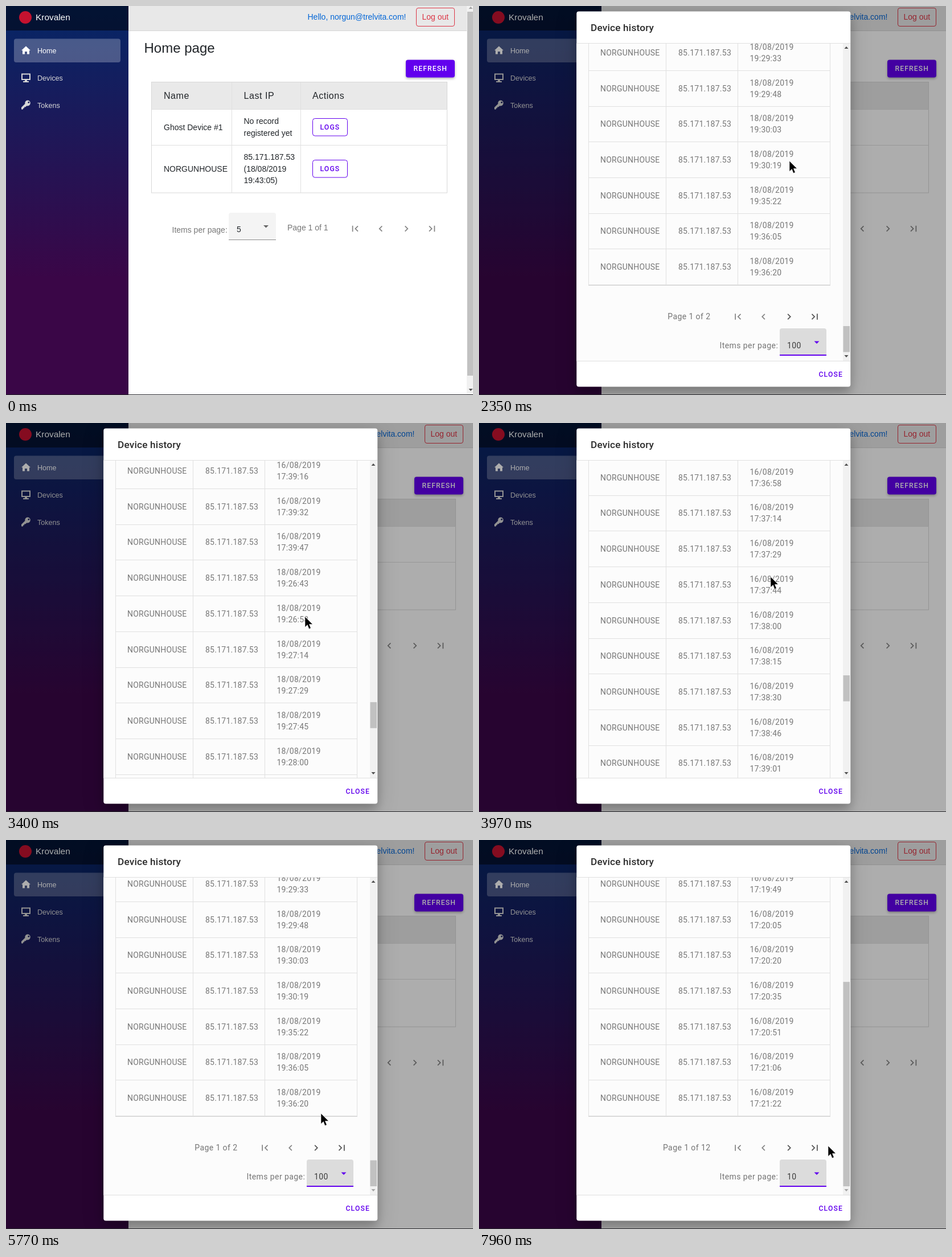
Recreate the animation shown at these times as an HTML page. Size 820 by 683 pixels, loop 7.99 s.

```html
<!DOCTYPE html>
<html lang="en">
<head>
<meta charset="utf-8">
<title>Device history</title>
<style>
html, body { margin: 0; width: 100%; height: 100%; overflow: hidden; background: #fff; }
svg { display: block; width: 820px; height: 683px; }
text { font: 14px "Liberation Sans", Arial, sans-serif; fill: #212529; white-space: pre; }
.nav text { font-size: 12.6px; fill: #d7d7d7; }
.nav path { fill: #d7d7d7; }
.nav .on { fill: #fff; }
.head text { font-size: 16px; letter-spacing: .55px; }
.muted text { fill: #777; }
text.btn { font: 500 12.25px Roboto, sans-serif; letter-spacing: 1.094px; fill: #6200ee; }
.line { fill: none; stroke: #e0e0e0; }
.outline { fill: #fff; stroke: #6200ee; }
.icons path { fill: #858585; }
#dialog { transform-origin: 411.7px 338.8px; }
#dialog text.title { font: 500 17.3px Roboto, sans-serif; letter-spacing: .15px; fill: #2c2c2c; }
#rows text { font-family: Roboto, sans-serif; letter-spacing: .25px; fill: #777; }
#foot text { font-family: Roboto, sans-serif; letter-spacing: .42px; fill: #747474; }
#foot .value { fill: #3c3c3c; }
#surface { filter: drop-shadow(0 10px 9px rgba(0,0,0,.22)) drop-shadow(0 6px 18px rgba(0,0,0,.14)); }
#popup text { font-family: Roboto, sans-serif; }
</style>
</head>
<body>
<svg viewBox="0 0 820 683" xmlns="http://www.w3.org/2000/svg">
  <defs>
    <linearGradient id="side" x1="0" y1="0" x2="0" y2="1">
      <stop offset="0" stop-color="#052767"/><stop offset=".7" stop-color="#3a0647"/>
    </linearGradient>
    <clipPath id="view"><rect x="171" y="66" width="481" height="557"/></clipPath>
    <g id="arrows" class="icons">
      <path transform="translate(-10.5 -10.5) scale(.875)" d="M18.41 16.59L13.82 12l4.59-4.59L17 6l-6 6 6 6zM6 6h2v12H6z"/>
      <path transform="translate(34.5 -10.5) scale(.875)" d="M15.41 7.41L14 6l-6 6 6 6 1.41-1.41L10.83 12z"/>
    </g>
    <g id="arrows2">
      <path transform="translate(79.5 -10.5) scale(.875)" d="M10 6L8.59 7.41 13.17 12l-4.58 4.59L10 18l6-6z"/>
      <path transform="translate(124.5 -10.5) scale(.875)" d="M5.59 7.41L10.18 12l-4.59 4.59L7 18l6-6-6-6zM16 6h2v12h-2z"/>
    </g>
  </defs>

  <rect width="820" height="683" fill="#fff"/>
  <rect x="215" width="605" height="43" fill="#e8e8e8"/>
  <path d="M215 43.5H820" stroke="#d6d5d5"/>

  <rect width="215" height="683" fill="url(#side)"/>
  <rect width="215" height="43" fill="#000" fill-opacity=".5"/>
  <circle cx="34" cy="20" r="11" fill="#c4122f"/>
  <text x="52" y="25" style="font-size:15.4px;fill:#fff">Krovalen</text>
  <g class="nav">
    <rect x="14" y="57.5" width="187" height="41.5" rx="4" fill="#fff" fill-opacity=".25"/>
    <path class="on" d="M35 70.5L43 78H41V84.5H37V80H33V84.5H29V78H27Z"/>
    <path fill-rule="evenodd" d="M27 118.5H43V130H37V132H40V134H30V132H33V130H27ZM29 120.5V128H41V120.5Z"/>
    <path fill-rule="evenodd" d="M38 165.5a5 5 0 1 1-1.6 9.8L34 177.6H32V179.5H30V181.5H27V178L33.4 171.7A5 5 0 0 1 38 165.5ZM39.8 167.7a1.5 1.5 0 1 0 .1 0Z"/>
    <text class="on" x="55" y="82.5">Home</text>
    <text x="55" y="130.5">Devices</text>
    <text x="55" y="178.5">Tokens</text>
  </g>

  <text x="242.5" y="82" style="font-size:24px">Home page</text>
  <g class="head">
    <rect id="thead" x="256" y="133" width="519" height="49" fill="#e9e9e9"/>
    <text x="277" y="162.5">Name</text>
    <text x="417.5" y="162.5">Last IP</text>
    <text x="538" y="162.5">Actions</text>
  </g>
  <rect id="table" class="line" x="255.5" y="133.5" width="519" height="194.5" style="stroke:#d8d8d8"/>
  <path id="rules" class="line"/>
  <text x="277" y="217.5">Ghost Device #1</text>
  <text x="277" y="290.5">NORGUNHOUSE</text>
  <text x="417.5" y="207">No record</text>
  <text x="417.5" y="228">registered yet</text>
  <text x="417.5" y="270">85.171.187.53</text>
  <text x="417.5" y="290.5">(18/08/2019</text>
  <text x="417.5" y="311">19:43:05)</text>
  <rect class="outline" x="538.5" y="197.5" width="61" height="30.5" rx="4"/>
  <rect class="outline" id="logs" x="538.5" y="270.5" width="61" height="30.5" rx="4"/>
  <text class="btn" x="551.5" y="217">LOGS</text>
  <text class="btn" x="551.5" y="290">LOGS</text>

  <g id="right">
    <text x="529.5" y="24" style="fill:#0366d6">Hello, norgun@trelvita.com!</text>
    <rect x="720.5" y="3.5" width="67" height="32" rx="3.5" fill="none" stroke="#dc3545"/>
    <text x="730.5" y="24" style="fill:#dc3545">Log out</text>
    <rect x="702" y="94.5" width="86" height="31" rx="4" fill="#6200ee" style="filter:drop-shadow(0 2px 2px rgba(0,0,0,.3))"/>
    <text class="btn" x="715.5" y="113.5" style="fill:#fff">REFRESH</text>
    <g class="muted">
      <text x="291.5" y="398">Items per page:</text>
      <text x="494" y="393.5">Page 1 of 1</text>
    </g>
    <path d="M391 411V367a4 4 0 0 1 4-4H470a4 4 0 0 1 4 4V411Z" fill="#f4f4f4"/>
    <path d="M391 410.5H474" stroke="#8a8a8a"/>
    <text x="405" y="397">5</text>
    <path d="M452 385H461L456.5 389.5Z" fill="#666"/>
    <g class="icons" transform="translate(613 391)"><use href="#arrows"/><use href="#arrows2" fill="#858585"/></g>
  </g>

  <g id="pageBar">
    <rect x="809" width="11" height="683" fill="#f1f1f1"/>
    <rect id="pageThumb" x="810" y="10" width="10" height="639"/>
    <path d="M812.5 672H819.5L816 676Z" fill="#505050"/>
    <path d="M812.5 5H819.5L816 1Z" fill="#a3a3a3"/>
  </g>

  <rect id="scrim" width="820" height="683" fill="#000"/>

  <g id="dialog">
    <rect id="surface" x="171.3" y="9.5" width="481" height="659" rx="4" fill="#fff"/>
    <text class="title" x="196" y="44">Device history</text>
    <g clip-path="url(#view)">
      <rect x="171.3" y="66" width="481" height="557" fill="#fcfcfc"/>
      <g id="rows"></g>
      <g id="foot">
        <path class="line" d="M192 485.5H617" style="stroke:#d4d4d4"/>
        <text id="pages" x="406.5" y="545" text-anchor="end"></text>
        <g transform="translate(454.5 540.5)"><use href="#arrows"/><use href="#arrows2" fill="#555"/></g>
        <text x="422.5" y="596">Items per page:</text>
        <path d="M528 609V565a4 4 0 0 1 4-4H606a4 4 0 0 1 4 4V609Z" fill="#dcdcdc"/>
        <path d="M528 608H610" stroke="#6200ee" stroke-width="2"/>
        <text id="size" class="value" x="541" y="596"></text>
        <path d="M588.5 583.5H597.5L593 588Z" fill="#6200ee"/>
      </g>
      <rect x="639" y="65" width="12.5" height="558" fill="#f1f1f1"/>
      <rect id="thumb" x="639.5" width="11.5" fill="#c1c1c1"/>
      <path d="M641.5 75H648.5L645 71Z" fill="#505050"/>
      <path id="down" d="M641.5 613H648.5L645 617Z"/>
    </g>
    <path class="line" d="M171.3 65.5H652M171.3 623.5H652"/>
    <text class="btn" x="596.5" y="650.5">CLOSE</text>
  </g>

  <g id="popup"><rect x="529.5" y="609.5" width="79" height="80" fill="#fff" stroke="#a0a0a0"/></g>
  <path d="M0 682.5H820" stroke="#26262a"/>
  <path id="cursor" d="M0 0V18.5L4.3 14.5 7 21.5 10.3 20.2 7.5 13.5H13.5Z" fill="#000" stroke="#fff" stroke-width=".6"/>
</svg>
<script>
const LOOP = 7990, OPEN = 1280, ROW = 62.7;
const VIEW = 558, TRACK = 528, EXTRA = 194;

// time, x, y of the pointer
const pointer = [
  [100, 814, 330], [340, 814, 330], [1090, 585, 283], [1400, 585, 283], [2350, 545, 272],
  [2860, 545, 272], [3400, 525, 340], [3970, 512, 270], [4450, 628, 612], [4900, 622, 657],
  [5260, 630, 600], [5770, 553, 480], [6070, 573, 575], [6700, 573, 575], [7180, 573, 637],
  [7540, 573, 637], [7780, 592, 472], [7960, 613, 537]
];
// time, distance above the end of the list
const scroll = [
  [1420, 3003], [2280, 80], [2350, 5], [2400, 0], [2860, 0], [3400, 884],
  [3970, 1460], [4400, 1700], [4560, 1700], [5500, 0]
];
// row, seconds of the day counted from 17:00
const stamps = [
  [0, 1143.3], [9, 1282.18], [45, 1832.65], [53, 1956.33], [70, 2218.65], [81, 2387.72],
  [82, 8803.3], [87, 8880.55], [93, 8973.1], [96, 9019.15], [97, 9322], [98, 9365], [99, 9380]
];

const $ = id => document.getElementById(id);
const clamp = v => Math.min(1, Math.max(0, v));
const smooth = u => u * u * (3 - 2 * u);
const set = (el, attrs) => { for (const k in attrs) el.setAttribute(k, attrs[k]); };
const show = (el, on) => { el.style.display = on ? '' : 'none'; };

function add(parent, tag, attrs, text = '') {
  const el = document.createElementNS('http://www.w3.org/2000/svg', tag);
  set(el, attrs);
  el.textContent = text;
  return parent.appendChild(el);
}

function at(keys, t, col = 1, ease = u => u) {
  if (t <= keys[0][0]) return keys[0][col];
  for (let i = 1; i < keys.length; i++) {
    const a = keys[i - 1], b = keys[i];
    if (t <= b[0]) return a[col] + (b[col] - a[col]) * ease((t - a[0]) / (b[0] - a[0]));
  }
  return keys[keys.length - 1][col];
}

// cubic-bezier(0, 0, .2, 1)
function decelerate(x) {
  let lo = 0, hi = 1;
  for (let i = 0; i < 20; i++) {
    const s = (lo + hi) / 2;
    if (.6 * s * s + .4 * s ** 3 < x) lo = s; else hi = s;
  }
  return 3 * lo * lo - 2 * lo ** 3;
}

function clock(i) {
  const s = Math.floor(at(stamps, i) + 1e-6);
  const two = n => String(n).padStart(2, '0');
  return [17 + Math.floor(s / 3600), two(Math.floor(s / 60) % 60), two(s % 60)].join(':');
}

const rows = Array.from({ length: 11 }, () => {
  const g = add($('rows'), 'g', {});
  add(g, 'path', { class: 'line', d: 'M192.5 -31V32M328.5 -31V32M454.5 -31V32M616.5 -31V32M192 31.5H617' });
  add(g, 'text', { x: 213, y: 5 }, 'NORGUNHOUSE');
  add(g, 'text', { x: 350, y: 5 }, '85.171.187.53');
  return { g, day: add(g, 'text', { x: 475.5, y: -5 }), time: add(g, 'text', { x: 475.5, y: 15 }) };
});

const options = ['5', '10', '25', '100'].map((label, i) => {
  const y = 610 + i * 17.5;
  return {
    y,
    bar: add($('popup'), 'rect', { x: 530, y, width: 78, height: 17.5 }),
    text: add($('popup'), 'text', { x: 542, y: y + 13.5 }, label)
  };
});

function drawList(t) {
  const count = t < 7360 ? 100 : 10;
  const off = count === 100 ? Math.round(at(scroll, t)) : 0;
  const last = 453 + off;
  const first = Math.max(0, count - 1 - Math.floor((last - 30) / ROW));
  rows.forEach((row, k) => {
    const i = first + k;
    show(row.g, i < count);
    if (i >= count) return;
    set(row.g, { transform: `translate(0 ${Math.round(last - (count - 1 - i) * ROW)})` });
    row.day.textContent = (i < 82 ? '16' : '18') + '/08/2019';
    row.time.textContent = clock(i);
  });
  set($('foot'), { transform: `translate(0 ${off})` });
  $('pages').textContent = 'Page 1 of ' + (count === 100 ? 2 : 12);
  $('size').textContent = count;

  const height = count * ROW + EXTRA;
  const size = TRACK * VIEW / height;
  const top = 80 + (TRACK - size) * (1 - off / (height - VIEW));
  set($('thumb'), { y: top, height: size });
  set($('down'), { fill: off ? '#505050' : '#a3a3a3' });
}

function drawPopup(t, y) {
  const open = t >= 6100 && t < 7330;
  show($('popup'), open);
  if (!open) return;
  const over = options.findIndex(o => y >= o.y && y < o.y + 17.5);
  options.forEach((o, i) => {
    const on = i === (over < 0 ? 3 : over);
    set(o.bar, { fill: on ? '#1e90ff' : '#fff' });
    o.text.style.fill = on ? '#fff' : '#222';
  });
}

function draw(t) {
  const opened = t >= OPEN;
  const grow = opened ? 15 : 0;
  const x = at(pointer, t, 1, smooth), y = at(pointer, t, 2, smooth);

  set($('right'), { transform: `translate(${grow} 0)` });
  set($('thead'), { width: 519 + grow });
  set($('table'), { width: 519 + grow });
  set($('rules'), { d: `M396.5 134V328M517.5 134V328M256 181.5H${775 + grow}M256 244.5H${775 + grow}` });
  show($('pageBar'), !opened);
  set($('pageThumb'), { fill: t >= 100 && x > 809 ? '#a8a8a8' : '#c1c1c1' });
  const hover = x > 538 && x < 600 && y > 270 && y < 301 && t < 1500;
  set($('logs'), { style: hover ? 'fill:#ece0fc' : '' });

  show($('dialog'), opened);
  set($('scrim'), { opacity: .32 * clamp((t - OPEN) / 150) });
  $('dialog').style.opacity = clamp((t - OPEN) / 75);
  $('dialog').style.transform = `scale(${.8 + .2 * decelerate(clamp((t - OPEN) / 150))})`;
  if (opened) drawList(t);
  drawPopup(t, y);

  show($('cursor'), t >= 100);
  set($('cursor'), { transform: `translate(${x.toFixed(1)} ${y.toFixed(1)})` });
}

const start = performance.now();
function tick() {
  draw((performance.now() - start) % LOOP);
  requestAnimationFrame(tick);
}
tick();
</script>
</body>
</html>
```
